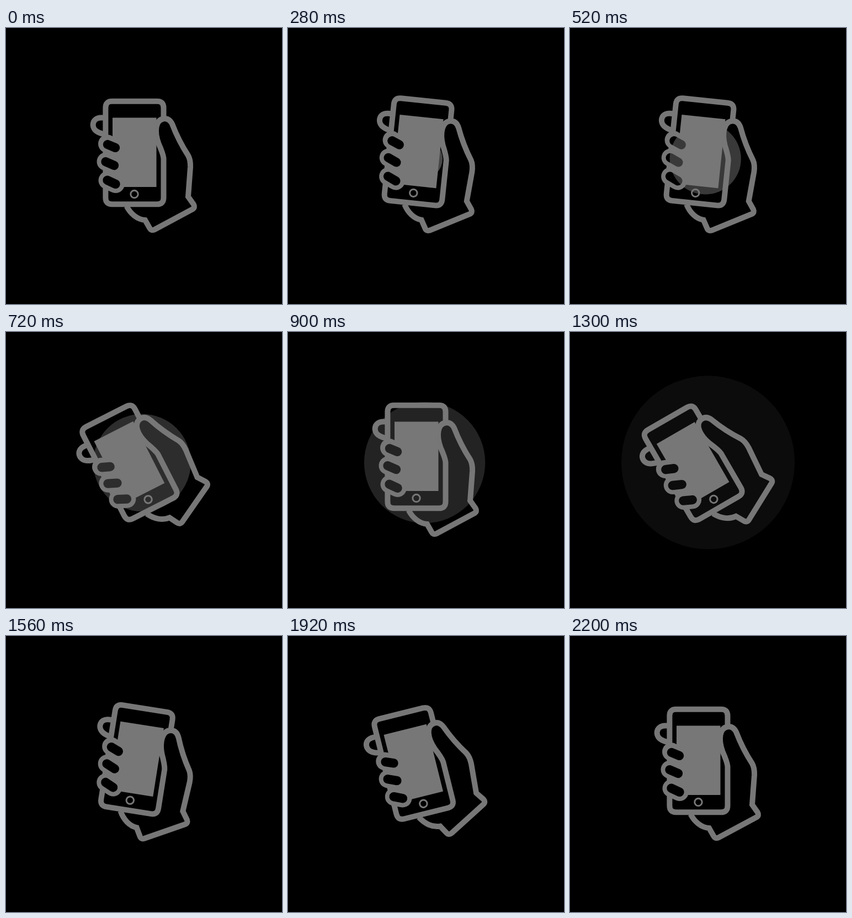
These frames come from a looping animation (500 by 500 pixels, 2420 ms). An HTML page:

```html
<!DOCTYPE html>
<html lang="en">
<head>
<meta charset="utf-8">
<title>Shaking phone</title>
<style>
  html, body { margin: 0; width: 100%; height: 100%; overflow: hidden; background: #000; }
  svg { display: block; width: 100%; height: 100%; }
</style>
</head>
<body>
<svg viewBox="0 0 500 500">
  <defs>
    <mask id="gaps" maskUnits="userSpaceOnUse" x="100" y="80" width="300" height="320">
      <rect x="100" y="80" width="300" height="320" fill="#fff"/>
      <path d="M184 211L198 216.800M180.500 242.200L196 249M183.500 275.800L198.500 282.700"
            stroke="#000" stroke-width="16.400" stroke-linecap="round"/>
    </mask>
  </defs>
  <circle id="pulse" fill="#777"/>
  <g id="hand">
    <g mask="url(#gaps)" fill="none" stroke="#777" stroke-width="10">
      <!-- phone outline running on into thumb, wrist and cuff -->
      <path d="M285.500 164V144.500Q285.500 132.700 273.700 132.700H192Q180.400 132.700 180.400 144.500V307.500
               Q180.400 319.300 192 319.300H273.700Q285.500 319.300 285.500 307.500V236
               Q284.700 228 276.300 209C268.500 187 271 167 285 164.500C293 163 298 167 301.500 175
               Q312.500 204 330 231Q334.500 239 334 252L330 305.500L339.800 319.500
               Q343 325 338 328.200L269 365.200Q263 368 260 362L252 348
               C238 347 226 337 218.500 323"/>
      <path d="M181 162.500H172C155 163 153 181.500 166.500 188.500Q172 191.500 181 193"/>
      <path d="M183.500 209.800L198 217M181 242L196 248.700M184 276L198.500 282.500"
            stroke-width="33" stroke-linecap="round"/>
      <rect x="193" y="162.500" width="79.500" height="125.500" fill="#777" stroke="none"/>
      <circle cx="232.500" cy="301" r="6.700" stroke-width="3"/>
    </g>
  </g>
</svg>
<script>
const LOOP = 2420, STEP = 20, END = 2200, FADE = 1500;
const swing = [[0, 0], [100, -30], [400, 30], [700, -30], [1000, 15],
               [1300, -30], [1600, 15], [1900, -15], [2200, 0]];
const hand = document.getElementById('hand');
const pulse = document.getElementById('pulse');

function angleAt(t) {
  const i = Math.max(1, swing.findIndex(k => t <= k[0]));
  const [t0, a0] = swing[i - 1], [t1, a1] = swing[i];
  return a0 + (a1 - a0) * (t - t0) / (t1 - t0);
}

function draw(ms) {
  const t = Math.min(END, Math.floor((ms % LOOP) / STEP) * STEP);
  hand.setAttribute('transform', `rotate(${angleAt(t)} 250 250)`);
  pulse.setAttribute('cx', 242 + 0.0062 * t);
  pulse.setAttribute('cy', 237.2 - 0.0006 * t);
  pulse.setAttribute('r', 3 + 0.1185 * t);
  pulse.setAttribute('fill-opacity', Math.max(0, 0.735 * (1 - t / FADE)));
}

function tick() {
  draw(performance.now());
  requestAnimationFrame(tick);
}
tick();
</script>
</body>
</html>
```
